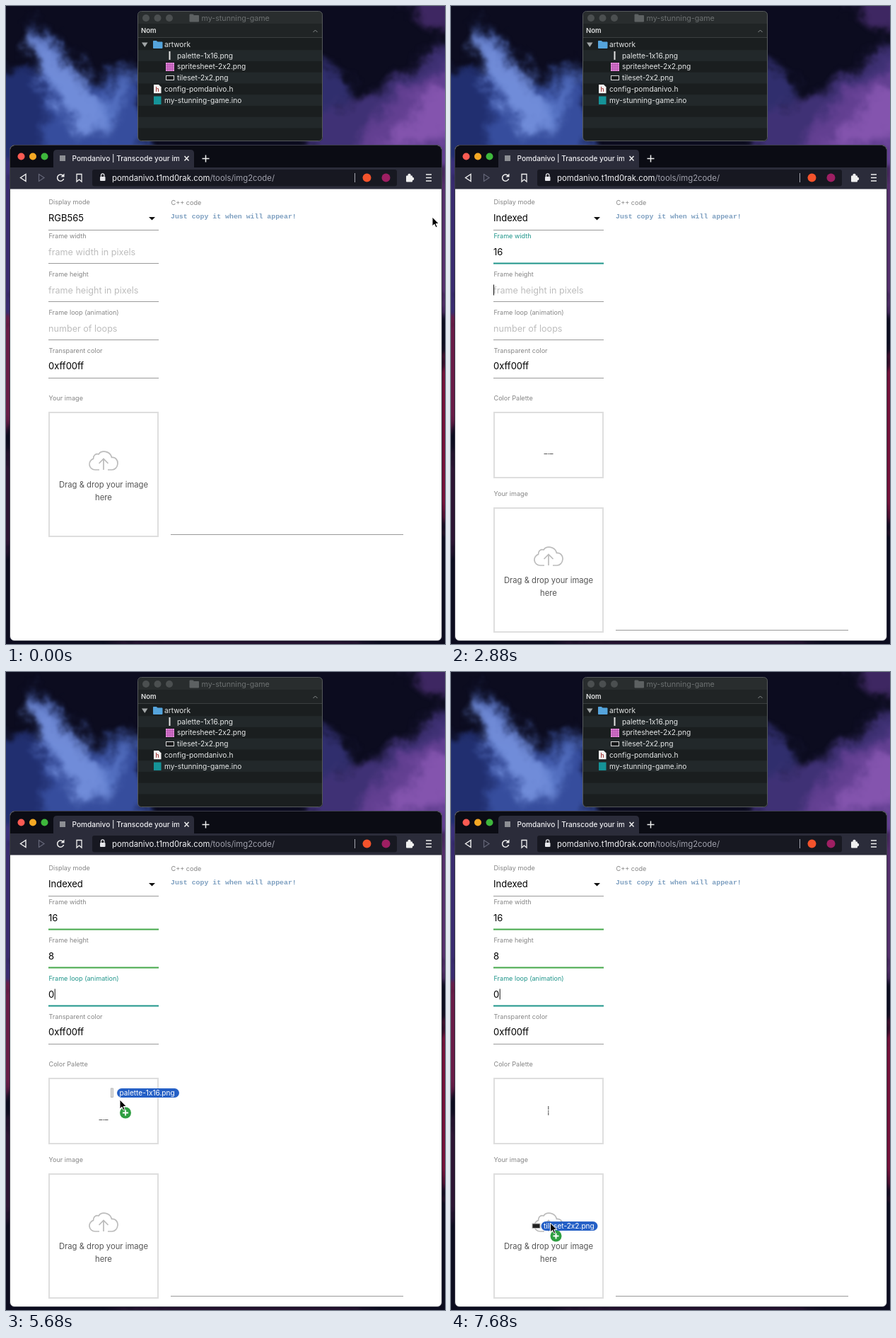
Write an HTML page that moves like this. It is 621 by 901 pixels and loops after 8000 ms.

```html
<!DOCTYPE html>
<html lang="en">
<head>
<meta charset="utf-8">
<style>
  html, body { margin: 0; width: 100%; height: 100%; overflow: hidden; background: #0c0c1e; }
  svg { display: block; font-family: Inter, "Open Sans", sans-serif; }
  .mono { font-family: "Liberation Mono", monospace; font-weight: 700; }
</style>
</head>
<body>
<svg id="stage" width="621" height="901" viewBox="0 0 621 901"></svg>
<script>
const TEAL = '#1f958a', GREY = '#868686';

// ---------- drawing helpers ----------
// Text is placed by its vertical middle.
const text = (x, y, size, fill, str, attrs = '') =>
  `<text x="${x}" y="${y + size * 0.36}" font-size="${size}" fill="${fill}" ${attrs}>${str}</text>`;
const rect = (x, y, w, h, fill, attrs = '') =>
  `<rect x="${x}" y="${y}" width="${w}" height="${h}" fill="${fill}" ${attrs}/>`;
const dot = (x, y, r, fill) => `<circle cx="${x}" cy="${y}" r="${r}" fill="${fill}"/>`;
const line = (d, stroke, width = 1, attrs = '') =>
  `<path d="${d}" fill="none" stroke="${stroke}" stroke-width="${width}" ${attrs}/>`;
const group = (id, body, attrs = '') => `<g id="${id}" ${attrs}>${body}</g>`;
const folder = (x, y, fill) =>
  `<path d="M${x} ${y}h4.5l1.5 1.5h6.5v8.5h-12.5z" fill="${fill}" stroke="${fill}" stroke-linejoin="round"/>`;
const plume = (d, fill, alpha) => `<path d="${d}z" fill="${fill}" opacity="${alpha}"/>`;
const glow = (x, y, rx, ry, fill) =>
  `<ellipse cx="${x}" cy="${y}" rx="${rx}" ry="${ry}" fill="${fill}" opacity=".85"/>`;

// ---------- scenery ----------
const sky = `
  <filter id="soft" filterUnits="userSpaceOnUse" x="-40" y="-40" width="701" height="981" color-interpolation-filters="sRGB">
    <feGaussianBlur in="SourceGraphic" stdDeviation="7" result="blurred"/>
    <feTurbulence type="fractalNoise" baseFrequency=".03" numOctaves="5" seed="7"/>
    <feDisplacementMap in="blurred" scale="42" xChannelSelector="R" yChannelSelector="G"/>
    <feGaussianBlur stdDeviation=".8"/>
  </filter>
  ${rect(0, 0, 621, 901, '#0c0c1f')}
  <g filter="url(#soft)">
    ${plume('M-40 95L50 85 110 120 200 100V240H-40', '#26377f', 0.85)}
    ${plume('M30 20L78 58 122 112 188 75 200 220H40L62 150 42 95', '#3c56a8', 0.8)}
    ${plume('M32 30L82 72 128 128 155 165 112 188 76 145 48 98', '#7793e0', 0.9)}
    ${plume('M186 82L168 130 138 170 126 142 154 112', '#5b78ca', 0.8)}
    ${plume('M430 70L490 105 475 145 430 150', '#3a3881', 0.8)}
    ${plume('M430 230V150L520 125 661 25V230', '#45367f', 0.9)}
    ${plume('M470 230L555 122 661 70V230', '#6c4399', 0.8)}
    ${plume('M535 200L595 122 661 115V180', '#8d59b6', 0.8)}
    ${plume('M555-40H661V45L585 25', '#4c2f74', 0.8)}
    ${glow(0, 330, 30, 120, '#42327e')}
    ${glow(0, 520, 30, 80, '#79204f')}
    ${glow(0, 700, 30, 70, '#331738')}
    ${glow(621, 330, 30, 100, '#613578')}
    ${glow(621, 610, 30, 120, '#86123f')}
    ${glow(330, 901, 180, 25, '#291332')}
  </g>`;

const rowY = i => 54.3 + 15.75 * i;
const files = [
  [224, 'artwork'], [242, 'palette-1x16.png'], [242, 'spritesheet-2x2.png'],
  [242, 'tileset-2x2.png'], [224, 'config-pomdanivo.h'], [224, 'my-stunning-game.ino']
];
const finder = `
  <clipPath id="finderClip"><rect x="187" y="8" width="261" height="183" rx="5"/></clipPath>
  <g clip-path="url(#finderClip)">
    ${rect(187, 8, 261, 183, '#1a1e1f')}
    ${rect(187, 8, 261, 17, '#292d2e')}
    ${rect(187, 25, 261, 20, '#202425')}
    ${rect(187, 44, 261, 1, '#3b3f40')}
    ${[1, 3, 5, 7].map(i => rect(187, rowY(i) - 7.9, 261, 15.75, '#22282a')).join('')}
    ${rect(187, 46.4, 261, 15.75, '#2258c4', 'id="target" opacity="0"')}
  </g>
  <rect x="186.5" y="7.5" width="261" height="183" rx="5" fill="none" stroke="#55595b"/>
  ${[198, 214.5, 231].map(x => dot(x, 17, 5, '#4b4f50')).join('')}
  ${folder(260, 12, '#5d6162')}
  ${text(276.5, 17, 10.7, '#6c7071', 'my-stunning-game')}
  ${text(191, 35, 9.5, '#e0e2e2', 'Nom', 'font-weight="600"')}
  ${line('M434.5 37l3-3 3 3', '#8a8e8f')}
  <path d="M192 51.5h8.5l-4.2 6.5z" fill="#a2a6a7"/>
  ${folder(208.5, 49.5, '#55a4dc')}
  ${rect(230.5, 64, 2, 12, '#e4e4e4')}
  ${rect(226, 80, 12, 12, '#e58fda')}
  ${line('M229 80v12M232 80v12M235 80v12M226 83h12M226 86h12M226 89h12', '#a238a0', 0.8)}
  ${rect(226.5, 98.5, 11, 6, '#17191a', 'stroke="#dcdcdc"')}
  <path d="M209 111h7l3.5 3.5v8.8h-10.5z" fill="#f4f4f4"/>
  ${text(211.5, 118, 8.5, '#a33a3a', 'h', 'font-weight="600"')}
  ${rect(209, 127.5, 10.5, 11.5, '#159398')}
  ${files.map(([x, name], i) => text(x, rowY(i), 10.2, '#e6e8e8', name)).join('')}`;

const browser = `
  <clipPath id="winClip"><rect x="6" y="197" width="610" height="699" rx="6"/></clipPath>
  <rect x="5.5" y="196.5" width="611" height="700" rx="6.5" fill="#fff" stroke="#3c3d4a"/>
  <g clip-path="url(#winClip)">
    ${rect(6, 197, 610, 31, '#0b0c14')}
    ${rect(6, 228, 610, 30.5, '#2b2c3a')}
    <path d="M67 228v-20q0-5 5-5h189q5 0 5 5v20z" fill="#2b2c3a"/>
  </g>
  ${dot(21.5, 212.5, 5, '#fb5b53')}${dot(38, 212.5, 5, '#f4a824')}${dot(54.5, 212.5, 5, '#3eb73c')}
  ${rect(76, 211, 8, 8, '#8d8f94')}
  <clipPath id="tabClip"><rect x="90" y="205" width="155" height="22"/></clipPath>
  ${text(93.5, 215.3, 10.1, '#f1f1f4', 'Pomdanivo | Transcode your im', 'font-weight="500" clip-path="url(#tabClip)"')}
  ${line('M252.5 212l6 6.5M258.5 212l-6 6.5M277.5 215.5h10M282.5 210.5v10', '#eee', 1.5)}
  ${line('M28 237.5v10l-7.5-5z', '#f0f0f0', 1.4)}
  ${line('M46.5 237.5v10l7.5-5z', '#66687a', 1.2)}
  ${line('M81 240a4.6 4.6 0 1 0 .6 4', '#f0f0f0', 1.5)}
  <path d="M82.5 236.5v5h-5z" fill="#f0f0f0"/>
  ${line('M100 237.5h7v10.5l-3.5-3-3.5 3z', '#f0f0f0', 1.3)}
  ${rect(122, 231, 431, 23.5, '#171821', 'rx="3"')}
  ${rect(133, 241, 7.5, 6, '#e6e6ea', 'rx="1"')}
  ${line('M134.5 241v-2a2.2 2.2 0 0 1 4.4 0v2', '#e6e6ea', 1.2)}
  <text x="150" y="246.8" font-size="11.35" fill="#f2f2f5">pomdanivo.t1md0rak.com<tspan fill="#a0a1ac">/tools/img2code/</tspan></text>
  ${rect(493, 236, 1, 13, '#a5a6b0')}
  ${dot(510.5, 242.5, 6, '#f4532c')}
  ${dot(537.5, 242.5, 6, '#9e1f63')}
  ${rect(566, 239.5, 9, 9, '#f0f0f0', 'rx="1"')}
  ${dot(570.5, 239, 2.2, '#f0f0f0')}${dot(575, 244, 2.2, '#f0f0f0')}
  ${line('M594 238h8M594 242.5h8M594 247h8', '#f0f0f0', 1.4)}`;

// ---------- page ----------
const fieldDefs = [
  { y: 277, label: 'Display mode', value: 'RGB565' },
  { y: 325, label: 'Frame width', hint: 'frame width in pixels' },
  { y: 379, label: 'Frame height', hint: 'frame height in pixels' },
  { y: 433, label: 'Frame loop (animation)', hint: 'number of loops' },
  { y: 486.5, label: 'Transparent color', value: '0xff00ff' }
];
const middle = f => f.y + 22;
const field = (f, i) => {
  const base = i ? Math.round(f.y + 38) : 316;
  return text(60.5, f.y, 9.1, GREY, f.label, `id="label${i}"`) +
    text(60, middle(f), 12.6, '#bdbdbd', f.hint || '', `id="hint${i}"`) +
    text(60, middle(f), 13, '#000', f.value || '', `id="value${i}"`) +
    rect(60, base, 156, 1, '#9a9a9a') +
    rect(60, base - 0.5, 156, 2, TEAL, `id="focus${i}" opacity="0"`) +
    rect(60, base - 0.5, 156, 2, '#45a84a', `id="valid${i}" opacity="0"`);
};
const uploadHint = what => `
  ${line('M132 655h-6a8 8 0 0 1-2.5-15.6c0-5 3.5-7.5 7.5-6.4c4-6 16-5 18.5 4.5c6-.5 9 4.5 8.5 9c-.5 5-4 8.5-8 8.5h-6M138 655v-15M131.5 646l6.5-6.5 6.5 6.5', '#bcbcbc', 1.7)}
  ${text(138, 675.5, 11.25, '#555', `Drag &amp; drop your ${what}`, 'text-anchor="middle"')}
  ${text(138, 693.5, 11.25, '#555', 'here', 'text-anchor="middle"')}`;
const zone = (y, h) => rect(61, y, 154, h, '#fff', 'stroke="#dedede" stroke-width="2"');
const white = (y, size, str) =>
  text(138.5, y, size, '#fff', str, 'text-anchor="middle" font-weight="700"');

const page = `
  ${fieldDefs.map(field).join('')}
  <path d="M202 298h9l-4.5 4.5z" fill="#111"/>
  ${rect(60, 0, 1, 15, '#111', 'id="caret"')}
  ${text(233.5, 277.5, 9.1, GREY, 'C++ code')}
  ${text(233, 296.5, 9.9, '#7d9fc0', 'Just copy it when will appear!', 'class="mono"')}
  ${group('palette', `
    ${text(60.5, 554, 9.1, GREY, 'Color Palette')}
    ${zone(574, 92)}
    ${group('oldPreview', line('M131.5 632.5h13', '#555', 1, 'stroke-dasharray="5 1 2 .5"'))}
    ${group('message', uploadHint('palette'), 'transform="translate(0 -41)"')}
    ${group('shade', rect(61, 574, 154, 92, '#000'))}
    ${group('newPreview', line('M137.8 613v13', '#444', 1, 'stroke-dasharray="5 1 2 .5"'))}
    ${group('info', white(604, 11, 'palette-1x16.png') + rect(126, 626.5, 25, 1, '#fff') +
      white(649.5, 9.8, 'Drag and drop or click ...'))}`)}
  ${group('image', text(60.5, 554, 9.1, GREY, 'Your image') + zone(574, 175) +
    uploadHint('image') + rect(233, 746, 329, 1, '#9a9a9a'))}
  ${group('menu', `
    ${rect(60, 281, 157, 125, '#fff', 'style="filter:drop-shadow(0 1px 1.5px #0006)"')}
    ${rect(60, 281, 157, 41.5, '#e8e8e8')}
    ${rect(60, 322.5, 157, 41.5, '#e8e8e8', 'id="hover"')}
    ${['RGB565', 'Indexed', 'HD [ gb.tft ]'].map((s, i) => text(73.5, 302.5 + 41.5 * i, 12.9, TEAL, s)).join('')}`)}`;

// ---------- pointers and dragged files, drawn around the hot spot ----------
const dragged = (id, x, y, width, name, icon) => group(id,
  icon + rect(x, y - 6.5, width, 13, '#2560c6', 'rx="6.5"') + text(x + 3.5, y, 10.1, '#fff', name));
const arrows = 'M0-7.5l3.5 4h-7zM0 7.5l3.5-4h-7zM-.7-4h1.4v8h-1.4zM-3-.7h6v1.4h-6z';
const pointer = group('pointer', `
  ${dragged('drag1', -4, -9.5, 88, files[1][1], rect(-12.5, -16, 3, 12.5, '#ddd', 'stroke="#aaa" stroke-width=".8"'))}
  ${dragged('drag2', -13, 4.5, 80, files[3][1], rect(-25.5, 1, 11, 6.5, '#222', 'stroke="#bbb"'))}
  ${group('badge', dot(8, 18.5, 8, '#2f9f42') + line('M8 14.5v8M4 18.5h8', '#fff', 2))}
  ${group('arrow', '<path d="M0 0V13L3 10.2 5 14.8 7.2 13.9 5.2 9.5H9.3Z" fill="#000" stroke="#fff"/>')}
  ${group('hand', '<path d="M-1.5 1q1.5-2 3 0v5l1.5-.7 1.5.9 1.5-.3 1 1 1 .5v4l-1.5 4h-7l-4.5-6q0-2 2-1.2l1.5 1.5z" fill="#fff" stroke="#222" stroke-linejoin="round"/>')}
  ${group('beam', line('M-3-7.5q3 0 3 2v11q0 2-3 2M3-7.5q-3 0-3 2v11q0 2 3 2', '#333', 1.2))}
  ${group('resize', `<path d="${arrows}" fill="#222" stroke="#fff" paint-order="stroke"/>`)}`);

document.getElementById('stage').innerHTML = sky + finder + browser + page + pointer;

// ---------- motion ----------
const $ = id => document.getElementById(id);
const alpha = (id, a) => $(id).setAttribute('opacity', a);
const show = (id, on) => alpha(id, on ? 1 : 0);
const ramp = (t, from, ms) => Math.min(1, Math.max(0, (t - from) / ms));
const swing = u => 0.5 - Math.cos(u * Math.PI) / 2;

// time, x, y of the pointer
const route = [
  [0, 603, 298], [600, 116, 311], [720, 116, 311], [1240, 116, 332], [1360, 116, 337],
  [4280, 116, 337], [4480, 217, 109], [5120, 242, 70], [5200, 242, 70], [5680, 161, 604],
  [5880, 150, 619], [6000, 150, 619], [6320, 258, 205], [6680, 252.5, 98], [7000, 252.5, 98],
  [7680, 140.5, 778], [8000, 140.5, 778]
];
function pointerAt(t) {
  const i = route.findIndex(k => k[0] > t);
  const [t0, x0, y0] = route[i - 1], [t1, x1, y1] = route[i];
  const u = swing((t - t0) / (t1 - t0));
  return [x0 + (x1 - x0) * u, y0 + (y1 - y0) * u];
}

function shapeAt(t, x, y, dragging) {
  if (dragging) return 'arrow';
  if (y > 192 && y < 212) return 'resize';
  if (x < 60 || x > 216 || y < 283) return 'arrow';
  if (t < 1520 || y < 317 || y > 570) return 'hand';
  return 'beam';
}

// focus and blur times of the fields
const focusTimes = [[760, 2040], [2040, 2880], [2880, 3360], [3360, Infinity]];

function drawFields(t) {
  $('value0').textContent = t < 1520 ? 'RGB565' : 'Indexed';
  const typed = ['', t < 2480 ? '' : t < 2680 ? '1' : '16', t < 3200 ? '' : '8', t < 4080 ? '' : '0'];
  focusTimes.forEach(([on, off], i) => {
    const amount = ramp(t, on, 280) - ramp(t, off, 280);
    alpha('focus' + i, amount);
    if (!i) return;
    alpha('valid' + i, ramp(t, off, 280));
    $('label' + i).setAttribute('fill', `color-mix(in srgb, ${TEAL} ${amount * 100}%, ${GREY})`);
    $('value' + i).textContent = typed[i];
    show('hint' + i, !typed[i]);
    if (t >= on && t < off) {
      $('caret').setAttribute('x', 60 + (typed[i] && $('value' + i).getComputedTextLength() + 0.5));
      $('caret').setAttribute('y', middle(fieldDefs[i]) - 7.5);
    }
  });
  show('caret', t >= 2040 && (t < 4080 || (t - 80) % 1000 >= 500));
}

function drawMenu(t, y) {
  const open = ramp(t, 720, 160) * (1 - ramp(t, 1480, 240));
  const scale = 0.3 + 0.7 * ramp(t, 720, 160);
  alpha('menu', open);
  $('menu').setAttribute('transform', `translate(60 281) scale(${scale}) translate(-60 -281)`);
  show('hover', y > 322);
}

function drawZones(t) {
  const dropped = t >= 6040;
  const preview = swing(ramp(t, 6140, 400));
  const info = 1 - ramp(t, 6320, 160);
  show('palette', t >= 1520);
  $('image').setAttribute('transform', `translate(0 ${t < 1520 ? 0 : 135})`);
  show('oldPreview', !dropped);
  alpha('message', dropped ? 1 - preview : 0);
  alpha('shade', 0.7 * preview * info);
  alpha('newPreview', preview);
  alpha('info', Math.min(1, 2.3 * preview) * info);
}

function drawPointer(t, x, y) {
  const first = t >= 5240 && t < 6040, second = t >= 7040;
  const shape = shapeAt(t, x, y, first || second);
  $('pointer').setAttribute('transform', `translate(${x} ${y})`);
  show('pointer', t < 2480 || t >= 4320);
  show('drag1', first);
  show('drag2', second);
  show('badge', (first || second) && y > 260);
  show('target', (first || second) && y < 110);
  for (const s of ['arrow', 'hand', 'beam', 'resize']) show(s, s === shape);
}

function frame(now) {
  const t = Math.floor(now % 8000 / 40) * 40;
  const [x, y] = pointerAt(t);
  drawFields(t);
  drawMenu(t, y);
  drawZones(t);
  drawPointer(t, x, y);
  requestAnimationFrame(frame);
}
requestAnimationFrame(frame);
</script>
</body>
</html>
```
